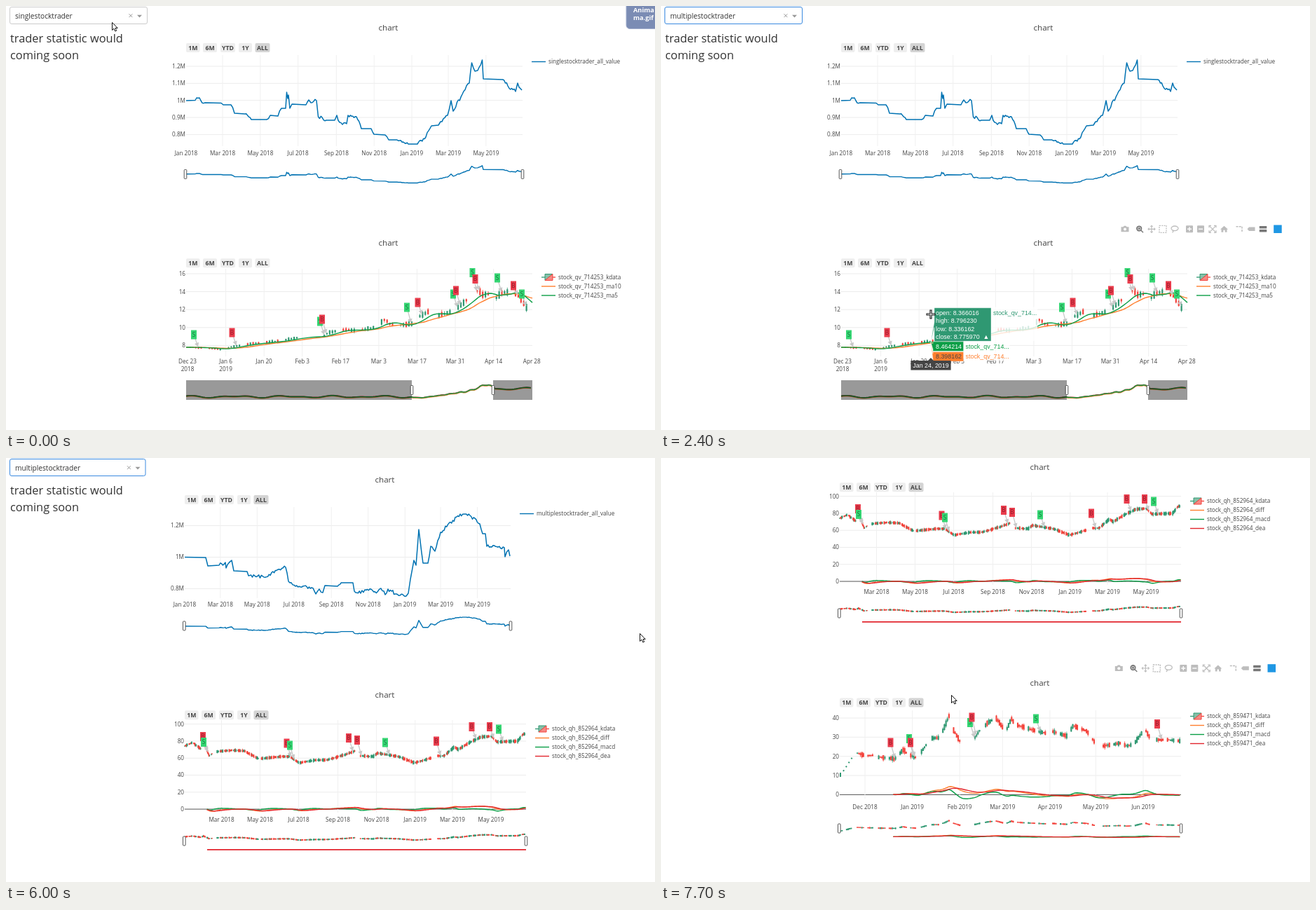
These frames come from a looping animation (926 by 605 pixels, 8000 ms). An HTML page:

```html
<!DOCTYPE html>
<html lang="en">
<head>
<meta charset="utf-8">
<title>Trader dashboard</title>
<style>
html, body { margin: 0; width: 100%; height: 100%; overflow: hidden; background: #fff; }
svg { display: block; width: 926px; height: 605px; }
text { font-family: "Open Sans", sans-serif; white-space: pre; }
.hover text { font-family: "Liberation Sans", Arial, sans-serif; }
</style>
</head>
<body>
<svg id="stage" viewBox="0 0 926 605"></svg>
<script>
const NS = 'http://www.w3.org/2000/svg';
const BLUE = '#0072b2', UP = '#2f9872', DOWN = '#f4433c', ORANGE = '#ff7f2e', GREEN = '#0b9e46', RED = '#e2262e';
const stage = document.getElementById('stage');

function el(parent, tag, attrs = {}, str) {
  const e = document.createElementNS(NS, tag);
  for (const k in attrs) e.setAttribute(k, attrs[k]);
  if (str != null) e.textContent = str;
  parent.appendChild(e);
  return e;
}
const group = (p, x = 0, y = 0) => el(p, 'g', { transform: `translate(${x},${y})` });
const box = (p, x, y, w, h, fill, more) => el(p, 'rect', { x, y, width: w, height: h, fill, ...more });
const line = (p, d, stroke, width = 1, more) =>
  el(p, 'path', { d, stroke, 'stroke-width': width, fill: 'none', 'stroke-linejoin': 'round', ...more });
const label = (p, str, x, yc, size = 8.2, fill = '#444', more) =>
  el(p, 'text', { x, y: yc + size * 0.36, 'font-size': size, fill, ...more }, str);
const mid = { 'text-anchor': 'middle' }, end = { 'text-anchor': 'end' };

// "x,y x,y | x,y" -> list of segments
const parse = s => s.split('|').map(seg => seg.trim().split(' ').map(p => p.split(',').map(Number)));
const mapY = (segs, f) => segs.map(seg => seg.map(([x, y]) => [x, f(y)]));
const toPath = pts => 'M' + pts.map(p => p.map(v => +v.toFixed(2)).join()).join('L');
function yAt(pts, x) {
  const last = pts[pts.length - 1];
  if (x <= pts[0][0]) return pts[0][1];
  if (x >= last[0]) return last[1];
  const i = pts.findIndex(p => p[0] >= x), [a, b] = [pts[i - 1], pts[i]];
  return a[1] + (b[1] - a[1]) * (x - a[0]) / (b[0] - a[0]);
}
function random(seed) {
  return () => (seed = (seed * 16807) % 2147483647) / 2147483647;
}

// adds small daily steps to sloping stretches
function rough(pts, amp) {
  const rnd = random(4321), out = [pts[0]];
  for (let i = 1; i < pts.length; i++) {
    const [a, b] = [pts[i - 1], pts[i]], dx = b[0] - a[0], dy = b[1] - a[1];
    const n = Math.abs(dy) > 1.5 ? Math.floor(dx / 1.7) : 0;
    for (let k = 1; k < n; k++) out.push([a[0] + dx * k / n, a[1] + dy * k / n + (rnd() - 0.5) * amp]);
    out.push(b);
  }
  return out;
}
function average(pts, span) {
  const out = [];
  for (let x = 257; x <= 751; x += 3.8) {
    let sum = 0;
    for (let k = 0; k < 10; k++) sum += yAt(pts, x - span * k / 10);
    out.push([x, sum / 10]);
  }
  return out;
}
function ema(list, span) {
  const keep = 1 - 2 / (span + 1);
  let s = 0, w = 0;
  return list.map(v => (s = s * keep + v) / (w = w * keep + 1));
}
// [diff, macd, dea] as lines around the zero level
function momentum(pts, day, zero) {
  const xs = [], step = day * 1.4;
  for (let x = 255; x <= 742; x += step) xs.push(x);
  const ys = xs.map(x => yAt(pts, x)), slow = ema(ys, 26);
  const diff = ema(ys, 12).map((v, i) => v - slow[i]).slice(25);
  const dea = ema(diff, 9), macd = diff.map((v, i) => 2 * (v - dea[i]));
  return [diff, macd, dea].map(l => l.map((v, i) => [xs[i + 25], zero + v]));
}

// weekday candles around a price curve; h runs from h0 to h1 along the axis
function candles(p, segs, sunday, day, w, h0, h1) {
  const rnd = random(77), out = { [UP]: ['', ''], [DOWN]: ['', ''] };
  for (const seg of segs) {
    const last = seg[seg.length - 1][0];
    for (let n = Math.ceil((seg[0][0] - sunday) / day); sunday + n * day <= last; n++) {
      if (((n + 1) % 7 + 7) % 7 < 2) continue;
      const x = sunday + n * day, y = yAt(seg, x);
      const slope = yAt(seg, x + day) - y;
      const h = h0 + (h1 - h0) * (x - 257) / 490;
      const body = 1 + h * rnd() + Math.abs(slope) * 0.5;
      const c = slope + (rnd() - 0.5) * h * 0.8 > 0 ? DOWN : UP;
      const top = y - body / 2, up = h * 0.4 * rnd(), dn = h * 0.4 * rnd();
      out[c][0] += `M${x.toFixed(1)},${top.toFixed(1)}v${body.toFixed(1)}`;
      out[c][1] += `M${x.toFixed(1)},${(top - up).toFixed(1)}v${(body + up + dn).toFixed(1)}`;
    }
  }
  for (const c in out) { line(p, out[c][0], c, w); line(p, out[c][1], c, 0.8); }
}

function grid(p, [x0, x1], [y0, y1], rows, cols, tickY) {
  for (const [name, y] of rows) {
    line(p, `M${x0},${y}H${x1}`, name === '0' ? '#555' : '#ececec');
    label(p, name, x0 - 1, y, 8.2, '#444', end);
  }
  for (const [name, x] of cols) {
    if (x > x0 + 4 && x < x1 - 4) line(p, `M${x},${y0}V${y1}`, '#f0f0f0');
    name.split('/').forEach((s, i) => label(p, s, x, tickY + i * 11, 8.2, '#444', mid));
  }
}
const spread = (s, first, step) => s.split(',').map((n, i) => [n, first + i * step]);
function months(year, month, count, step, x, day) {
  const first = Date.UTC(year, month, 1);
  return Array.from({ length: count }, (_, i) => {
    const d = new Date(Date.UTC(year, month + i * step, 1));
    const name = d.toLocaleDateString('en-US', { month: 'short', timeZone: 'UTC' });
    return [`${name} ${d.getUTCFullYear()}`, x + (d - first) / 864e5 * day];
  });
}

function handles(p, y, ...xs) {
  for (const x of xs) box(p, x - 1.8, y, 3.6, 13, '#fff', { stroke: '#444', 'stroke-width': 0.9, rx: 1 });
}

function tags(p, price, s) {
  for (const t of s.split(' ')) {
    const kind = t[0], [x, y] = t.slice(1).split(',').map(Number);
    const tx = x + 6, ty = yAt(price, tx) - 1;
    const a = Math.atan2(ty - y, tx - x) * 180 / Math.PI;
    line(p, `M${x},${y}L${tx},${ty}`, '#c9c9c9', 1.3);
    el(p, 'path', { d: 'M0,0L-6,-3.2V3.2z', fill: '#c9c9c9', transform: `translate(${tx},${ty}) rotate(${a})` });
    box(p, x - 4, y - 6.5, 8, 13, kind === 'S' ? '#35d673' : '#ea3d4d');
    label(p, kind, x, y, 8.2, kind === 'S' ? '#14713a' : '#8c1424', mid);
  }
}

function legend(p, x, y, names, colors) {
  names.forEach((n, i) => {
    const yy = y + i * 13;
    if (n.endsWith('kdata')) {
      line(p, `M${x},${yy}h5`, UP, 1.3);
      line(p, `M${x + 16},${yy}h4`, DOWN, 1.3);
      el(p, 'path', { d: `M${x + 5},${yy - 4.5}h11l-11,9z`, fill: '#86bfa8', stroke: UP });
      el(p, 'path', { d: `M${x + 16},${yy - 4.5}v9h-11z`, fill: '#f58a85', stroke: DOWN });
    } else line(p, `M${x},${yy}h20`, colors[i], 1.4);
    label(p, n, x + 24, yy);
  });
}

function frame(p, row, cx, x, active) {
  const y = 31 + row * 307.2;
  label(p, 'chart', cx, y, 11.6, '#444', mid);
  [['1M', 0, 19.5], ['6M', 24, 20], ['YTD', 49, 21], ['1Y', 75, 19], ['ALL', 98.5, 21]].forEach(([s, dx, w]) => {
    box(p, x + dx, y + 22, w, 13, s === 'ALL' && active ? '#d4d4d4' : '#eee', { rx: 2 });
    label(p, s, x + dx + w / 2, y + 28.5, 8.7, '#444', { ...mid, 'font-weight': 700 });
  });
}

function modebar(p, x, y, full) {
  const bar = group(p, x, y), soft = '#bdbdbd', dark = '#777';
  const at = dx => group(bar, dx, 0);
  const shift = full ? 0 : 33;
  let g = at(full ? -218 : -186);
  el(g, 'path', { d: 'M-5.5,-3h3l1,-1.5h3l1,1.5h3v7h-11z', fill: soft });
  el(g, 'circle', { r: 2, cy: 0.3, fill: '#fff' });
  g = at(-197 + shift);
  el(g, 'circle', { r: 3.2, cx: -0.8, cy: -0.8, fill: 'none', stroke: dark, 'stroke-width': 1.8 });
  line(g, 'M1.8,1.8L5,5M-2.5,-.8h3.4M-.8,-2.5v3.4', dark, 1.4);
  g = at(-180 + shift);
  line(g, 'M-5,0H5M0,-5V5', soft, 1.2);
  for (const turn of [0, 90, 180, 270])
    line(g, 'M3.4,-1.6L5,0L3.4,1.6', soft, 1.2, { transform: `rotate(${turn})` });
  if (full) {
    line(at(-164), 'M-5,-5H5V5H-5z', soft, 1.3, { 'stroke-dasharray': '2 1.3' });
    g = at(-147);
    el(g, 'ellipse', { rx: 5, ry: 3.3, cy: -1, fill: 'none', stroke: soft, 'stroke-width': 1.3 });
    line(g, 'M-3,1.5q2,2 -.5,3.5', soft, 1.3);
  }
  for (const [dx, d] of [[-126, 'M-3,0H3M0,-3V3'], [-110, 'M-3,0H3']]) {
    g = at(dx);
    box(g, -5, -5, 10, 10, soft, { rx: 1 });
    line(g, d, '#fff', 1.4);
  }
  g = at(-93);
  for (const turn of [0, 90, 180, 270])
    line(g, 'M2,-5H5V-2M0,0L4,-4', soft, 1.2, { transform: `rotate(${turn})` });
  el(at(-76.5), 'path', { d: 'M-5.5,.5L0,-4.5L5.5,.5H4V4.5H1.2V1.5H-1.2V4.5H-4V.5z', fill: soft });
  line(at(-55), 'M-4.5,-3.5H4M4,-3.5V5', soft, 1.4, { 'stroke-dasharray': '3 1.2' });
  el(at(-38), 'path', { d: 'M-5.5,0l2.5,-2.8h8.5v5.6h-8.5z', fill: soft });
  g = at(-21);
  box(g, -5.2, -4.3, 10.5, 3.6, dark, { rx: 0.6 });
  box(g, -5.2, 0.7, 10.5, 3.6, dark, { rx: 0.6 });
  box(bar, -5.8, -5.8, 11.5, 11.5, '#1f97e4');
  return bar;
}

const names = (code, kinds) => kinds.split(' ').map(k => `stock_${code}_${k}`);
const codeA = 'qv_714253', codeB = 'qh_852964', codeC = 'qh_859471';

const single = rough(parse('257,135 270,134.5 276,131 278,135 284,138 307,138.5 310,141 321,141 326,153 341,154 350,162 372,162 377,156 388,157 393,146 399,146 400.5,123 402,132 403,127 405,146 408,140 428,141 432,134 435,138 443,135 445.5,158 457,163 469,163 472,156 476,166 486,168 488,156 500,158 507,175 521,175 525,183 541,184 546,191 558,191 574,197 587,197 599,187 607,171 617,170 620,165 630,156 635,135 638,150 651,126 661,110 664.5,81 669,93 673,92 679.5,77 681,104 709,105 716,114 727,122 730,110 736,120')[0], 5);
const multi = rough(parse('255,33.5 285,34 288,46 304,45 313,41 314,49 322,38 325,53 344,54 346,60 368,62 388,51 399,48 403,68 413,75 436,77 442,86 447,79 452,84 455,74 473,75 480,70 495,70 497,82 506,85 512,80 530,83 535,78 541,87 545,79 557,86 571,89 574,85 577,65 582,38 585,45 589,-6 595,42 602,42 606,18 612,25 620,-2 648,-28 662,-26 676,-14 680,0 684,0 686,18 711,20 712,33 717,23 719,32')[0], 5);
const priceA = parse('259,487 285,488 305,490 330,485 350,482 390,478 417,473 | 453,471 460,466 482,462 500,463 525,459 541,447 548,454 560,456 580,453 590,443 603,436 | 616,442 633,437 645,430 658,419 | 671,408 674,405 680,412 690,411 | 699,417 707,409 725,408 733,416 744,432');
const priceB = parse('255,303 266,298 278,307 282,298 290,317 294,314 | 301,311 322,309 340,310 360,321 | 364,321 392,318 405,318 418,327 442,323 458,323 485,315 498,310 | 505,317 524,318 530,313 560,318 583,327 607,320 | 614,317 625,317 640,304 645,308 665,296 678,290 693,289 700,297 730,296 738,286 742,286');
const priceC = parse('255,452 273,427 | 280,421 292,425 304,424 | 310,427 334,429 346,416 351,422 365,428 | 366,427 380,407 | 386,400 398,399 404,385 411,368 416,386 427,405 | 447,400 456,387 | 460,385 466,378 478,371 488,385 494,386 500,372 505,380 530,388 550,393 | 558,390 580,397 588,382 608,390 619,406 | 631,411 655,407 665,411 675,408 685,394 690,386 697,398 | 706,402 722,402 742,404');
const [flatA, flatB, flatC] = [priceA, priceB, priceC].map(p => p.flat());
const ma5 = average(flatA, 27), ma10 = average(flatA, 54);

const page = group(stage);

// side panel
const side = group(page);
label(side, 'trader statistic would', 6, 46.2, 16.4, '#333');
label(side, 'coming soon', 6, 70.2, 16.4, '#333');
const field = box(side, 5.5, 1.5, 196, 24, '#fff', { rx: 2.5 });
const chosen = label(side, '', 13, 14, 10.2, '#333');
const clear = line(side, 'M175.5,11.3l4.8,4.8m0,-4.8l-4.8,4.8', '#999', 1);
const caret = el(side, 'path', { fill: '#999' });
const menu = group(side);
box(menu, 5.5, 25.5, 196, 48.5, '#fff', { stroke: '#ccc' });
const hot = box(menu, 6, 50, 195, 23.5, '#e4f2fb');
label(menu, 'singlestocktrader', 10, 38.7, 10.2, '#333', { 'font-weight': 700 });
label(menu, 'multiplestocktrader', 10, 62.2, 10.2, '#666');

// first pair of charts
const pair = group(page);
frame(pair, 0, 545.5, 257, true);
frame(pair, 1, 545.5, 257, false);
grid(pair, [257, 737], [70, 200], spread('1.2M,1.1M,1M,0.9M,0.8M', 86, 24.35), months(2018, 0, 9, 2, 257, 0.8822), 210);
line(pair, toPath(single), BLUE, 1.5);
line(pair, toPath(single.map(([x, y]) => [x, 228 + (y - 78) * 0.206])), BLUE, 1.4);
handles(pair, 233.5, 256, 737);
legend(pair, 750, 79.5, ['singlestocktrader_all_value'], [BLUE]);

grid(pair, [257, 751], [375, 500], spread('16,14,12,10,8', 382, 25.6),
  spread('Dec 23/2018,Jan 6/2019,Jan 20,Feb 3,Feb 17,Mar 3,Mar 17,Mar 31,Apr 14,Apr 28', 259, 54.58), 507);
candles(pair, priceA, 259, 3.9, 2.2, 1.5, 9);
line(pair, toPath(ma10), ORANGE, 1.4);
line(pair, toPath(ma5), GREEN, 1.4);
tags(pair, flatA, 'S268,469 B322.5,466 S448,450 B451,447 S572,430 B587.5,423 S638,411 B642,406 S665.5,380.5 B669.5,389.5 S701,388 B724,399 S736,411');
legend(pair, 764, 387, names(codeA, 'kdata ma10 ma5'), [0, ORANGE, GREEN]);
const mini = [];
for (let x = 257; x <= 751; x += 3) {
  const wave = Math.sin(x / 11) + 0.7 * Math.sin(x / 6.3);
  mini.push([x, x < 580 ? 557.4 + wave : x < 696 ? 541 + (yAt(ma5, 257 + (x - 580) * 4.3) - 411) * 0.23 : 546 + wave]);
}
line(pair, toPath(mini), RED, 2);
line(pair, toPath(mini.map(([x, y]) => [x, y + 1])), ORANGE, 1);
line(pair, toPath(mini), GREEN, 1.4);
box(pair, 257, 534, 322, 28, 'rgba(0,0,0,.4)');
box(pair, 695, 534, 56, 28, 'rgba(0,0,0,.4)');
handles(pair, 541.5, 579, 695);
const bars = [modebar(pair, 880, 11), modebar(pair, 880, 318.3, true)];

// three charts of the second trader
const trio = group(page);
for (let i = 0; i < 3; i++) frame(trio, i, 540.5, 255, true);
const one = group(trio, 0, 108), two = group(trio, 0, 108), three = group(trio, 0, 325);
grid(one, [255, 720], [-38, 92], spread('1.2M,1M,0.8M', -11.5, 45), months(2018, 0, 9, 2, 255, 0.861), 101.5);
line(one, toPath(multi), BLUE, 1.5);
line(one, toPath(multi.map(([x, y]) => [x, 132 + (y - 33.5) * 0.21])), BLUE, 1.4);
handles(one, 125, 254.3, 720);
legend(one, 733, -28.5, ['multiplestocktrader_all_value'], [BLUE]);

const shades = [ORANGE, GREEN, RED];
const kinds = 'kdata diff macd dea';
grid(two, [255, 742], [266, 398], spread('100,80,60,40,20,0', 271.7, 24.27), months(2018, 2, 8, 2, 307.5, 0.9026), 408.5);
candles(two, priceB, 254.1, 0.905, 1.6, 3, 4);
momentum(flatB, 0.905, 393).forEach((l, i) => line(two, toPath(l), shades[i], 1.4));
tags(two, flatB, 'B281,289.5 S282,297.5 B400.5,299 S405,302 B489,291.5 B501,294.5 S541,298 B614,296 B664.5,275.5 B690,275.5 S703,279');
candles(two, mapY(priceB, y => 429 + (y - 286) * 0.2), 254.1, 0.905, 1.6, 1.2, 1.2);
line(two, 'M287,450.8H742', RED, 1.8);
handles(two, 432, 254.3, 742);
legend(two, 755, 278.5, names(codeB, kinds), [0, ...shades]);

grid(three, [255, 742], [360, 486], spread('40,30,20,10,0', 371, 27.35), months(2018, 11, 7, 1, 291, 2.181), 498.5);
candles(three, priceC.slice(1), 293.2, 2.18, 2.1, 6, 6);
line(three, 'M256,449v6', UP, 2);
line(three, 'M260,447L275,424', UP, 2, { 'stroke-dasharray': '2 5' });
momentum(flatC, 2.18, 480.4).forEach((l, i) => {
  line(three, toPath(l), shades[i], 1.4);
  line(three, toPath(l.map(([x, y]) => [x, 540.3 + (y - 480) * 0.18])), shades[i], 1.3);
});
tags(three, flatC, 'B327.5,406 S354,400.5 B356,406 S441,377.5 B443.5,370 S535,372 B708,379.5');
candles(three, mapY(priceC, y => 517.5 + (y - 368) * 0.18), 293.2, 2.18, 2.1, 1.2, 1.2);
handles(three, 522, 254.3, 742);
legend(three, 755, 368.5, names(codeC, kinds), [0, ...shades]);
const trioBars = [11, 318, 625].map((y, i) => modebar(trio, 871.3, y, i > 0));

const tips = el(page, 'g', { class: 'hover' });

function tip(x, y, top, fill, lines, name, ink = '#fff', dx = 5) {
  const many = lines.length > 1, h = many ? 48 : 13.5;
  const w = many ? 81 : lines[0].length * 4.7 + 7 - dx / 3;
  const cy = top + h / 2;
  if (name) box(tips, x + dx + w, top - 1, 66, h, '#fff', { opacity: 0.8 });
  el(tips, 'path', { d: `M${x},${y}L${x + dx},${cy - 4}V${top}h${w}v${h}h${-w}V${cy + 4}z`, fill, stroke: '#fff', 'stroke-width': 0.4 });
  lines.forEach((s, i) => label(tips, s, x + 7, top + 6.7 + i * 11.6, 8.9, ink));
  if (name) label(tips, name.slice(0, 12) + '...', x + dx + w + 3, top + 6.7, 8.9, fill);
}
function dateTip(x, y, year, month, day, later) {
  const s = new Date(year, month, day + Math.round(later))
    .toLocaleDateString('en-US', { month: 'short', day: 'numeric', year: 'numeric' });
  const w = s.length * 4.6 + 2;
  el(tips, 'path', { d: `M${x},${y - 4}l4,4h${w / 2 - 4}v13.5h${-w}v-13.5h${w / 2 - 4}z`, fill: '#444' });
  label(tips, s, x, y + 6.8, 8.9, '#fff', mid);
}
const ohlc = o => [['open', 0], ['high', 0.430214], ['low', -0.029854], ['close', 0.409954]]
  .map(([k, d]) => `${k}: ${(o + d).toPrecision(7)}${k === 'close' ? '  ▲' : ''}`);
const hovers = {
  top(x, value) {
    const y = value ? 158 : yAt(single, x);
    tip(x, y, y - 6, BLUE, [(value || 1000 - (y - 134.7) * 4.1).toFixed(4) + 'k']);
    dateTip(x, 209, 2018, 0, 1, (x - 257) / 0.8822);
  },
  low(x, open) {
    const y = open ? 462 : yAt(ma5, x), n = names(codeA, 'kdata ma10 ma5');
    const o = open || 16 - (y - 382) / 12.8;
    tip(x, y, y - 49, UP, ohlc(o), n[0]);
    tip(x, y, y - 0.8, GREEN, [(o + 0.098198).toPrecision(7)], n[2], '#fff', 3);
    tip(x, y, y + 13.8, ORANGE, [(o + 0.032146).toPrecision(7)], n[1], '#444', 3);
    dateTip(x, 506, 2018, 11, 23, (x - 259) / 3.9);
  },
  last(x, open) {
    const n = names(codeC, kinds);
    tip(x, 732, 704, UP, ohlc(open), n[0]);
    ['-1.604127', '-1.138402', '-1.034926'].forEach((s, i) =>
      tip(x, 808, 782 + i * 14.5, shades[i], [s], n[i + 1], i ? '#fff' : '#444', 3));
    dateTip(x, 823, 2018, 11, 1, (x - 291) / 2.18);
  }
};

// dragged file label and cursors
const file = group(stage);
box(file, 885, -8, 60, 40.5, '#7b8cb4', { rx: 5, stroke: '#a5b1cf' });
label(file, 'Anima', 895, 5.5, 9.2, '#fff', { 'font-weight': 700 });
label(file, 'ma.gif', 895, 17, 9.2, '#fff', { 'font-weight': 700 });

const cursors = { arrow: group(stage), cross: group(stage), beam: group(stage) };
el(cursors.arrow, 'path', { d: 'M.5,.5V11.5L3,9.2L4.8,13L6.7,12.2L5,8.5H8.2z', fill: '#fff', stroke: '#111', 'stroke-width': 1 });
line(cursors.cross, 'M-6.5,0H6.5M0,-6.5V6.5', '#111', 3.2);
line(cursors.cross, 'M-5.5,0H5.5M0,-5.5V5.5', '#fff', 1);
line(cursors.beam, 'M-3,-6H-1L0,-5L1,-6H3M0,-5V5M-3,6H-1L0,5L1,6H3M-1.5,0H1.5', '#111', 1.3);

// cursor glide in 100 ms steps
const glide = (kind, from, n, x0, y0, x1, y1) => Array.from({ length: n }, (_, i) => {
  const k = i / (n - 1);
  return [from + i * 100, { cur: [kind, x0 + (x1 - x0) * k, y0 + (y1 - y0) * k] }];
});

const steps = [
  [0, { cur: ['arrow', 151, 23], file: [0, 0], pick: 'singlestocktrader', bars: [0, 0, 0], scroll: 0 }],
  [100, { file: [18, -8] }],
  [200, { file: null }],
  [400, { open: 1, cur: ['arrow', 146, 26] }],
  ...glide('beam', 600, 5, 120, 38, 50, 60),
  [800, { hot: 1 }],
  [1200, { open: 0, focus: 1, pick: 'multiplestocktrader' }],
  ...glide('arrow', 1300, 2, 150, 95, 240, 125),
  ...glide('cross', 1500, 3, 320, 160, 430, 280),
  ...glide('cross', 1800, 3, 455, 385, 481, 510),
  [1400, { bars: [0.4, 0, 0] }],
  [1500, { bars: [1, 0, 0], tip: ['top', 320] }],
  [1600, { tip: ['top', 385] }],
  [1700, { tip: null }],
  [1800, { bars: [0.6, 0.5, 0], tip: ['low', 458] }],
  [1900, { bars: [0.3, 1, 0], tip: ['low', 500] }],
  [2000, { bars: [0.08, 1, 0], tip: ['low', 524, 9.619896] }],
  ...glide('cross', 2100, 4, 455, 495, 385, 440),
  [2100, { bars: [0, 1, 0], tip: ['low', 458] }],
  [2200, { tip: ['low', 358] }],
  [2300, { tip: ['low', 372] }],
  [2400, { tip: ['low', 385] }],
  [3800, { cur: ['cross', 796, 188.5], bars: [1, 0, 0], tip: ['top', 470.5, 902.8601] }],
  [4000, { cur: ['cross', 811, 197.5] }],
  [5600, { cur: ['arrow', 810, 195.5] }],
  [5800, { trio: 1, tip: null }],
  [6000, { cur: ['arrow', 904, 250], bars: [0, 0, 0] }],
  [6200, { cur: ['arrow', 835.5, 343], bars: [0, 1, 0] }],
  [6600, { scroll: 108 }],
  [6800, { scroll: 175 }],
  [7000, { scroll: 301 }],
  [7200, { scroll: 325 }],
  [7500, { cur: ['cross', 632, 440], bars: [0, 0, 1], tip: ['last', 624, 25.41782] }],
  [7700, { cur: ['arrow', 414, 338], tip: null }]
].sort((a, b) => a[0] - b[0]);

const show = (g, on) => g.setAttribute('display', on ? 'inline' : 'none');
const move = (g, x, y) => g.setAttribute('transform', `translate(${x},${y})`);

function draw(s) {
  move(page, 0, -s.scroll);
  show(pair, !s.trio);
  show(trio, s.trio);
  show(menu, s.open);
  hot.setAttribute('y', s.hot ? 50 : 26);
  chosen.textContent = s.pick;
  field.setAttribute('stroke', s.focus ? '#3a8ae0' : '#ccc');
  field.setAttribute('width', s.trio ? 193.5 : 196);
  for (const part of [clear, caret]) move(part, s.trio ? -2.5 : 0, 0);
  caret.setAttribute('d', s.open ? 'M187,16h7l-3.5,-3.5z' : 'M187,12.8h7l-3.5,3.6z');
  for (const set of [bars, trioBars]) set.forEach((b, i) => b.setAttribute('opacity', s.bars[i]));
  show(file, s.file);
  if (s.file) move(file, ...s.file);
  tips.replaceChildren();
  if (s.tip) hovers[s.tip[0]](...s.tip.slice(1));
  for (const k in cursors) show(cursors[k], k === s.cur[0]);
  move(cursors[s.cur[0]], s.cur[1], s.cur[2]);
}

let shown = -1;
const start = performance.now();
function tick() {
  const t = (performance.now() - start) % 8000;
  const i = steps.filter(s => s[0] <= t).length - 1;
  if (i !== shown) {
    shown = i;
    draw(Object.assign({}, ...steps.slice(0, i + 1).map(s => s[1])));
  }
  requestAnimationFrame(tick);
}
tick();
</script>
</body>
</html>
```
